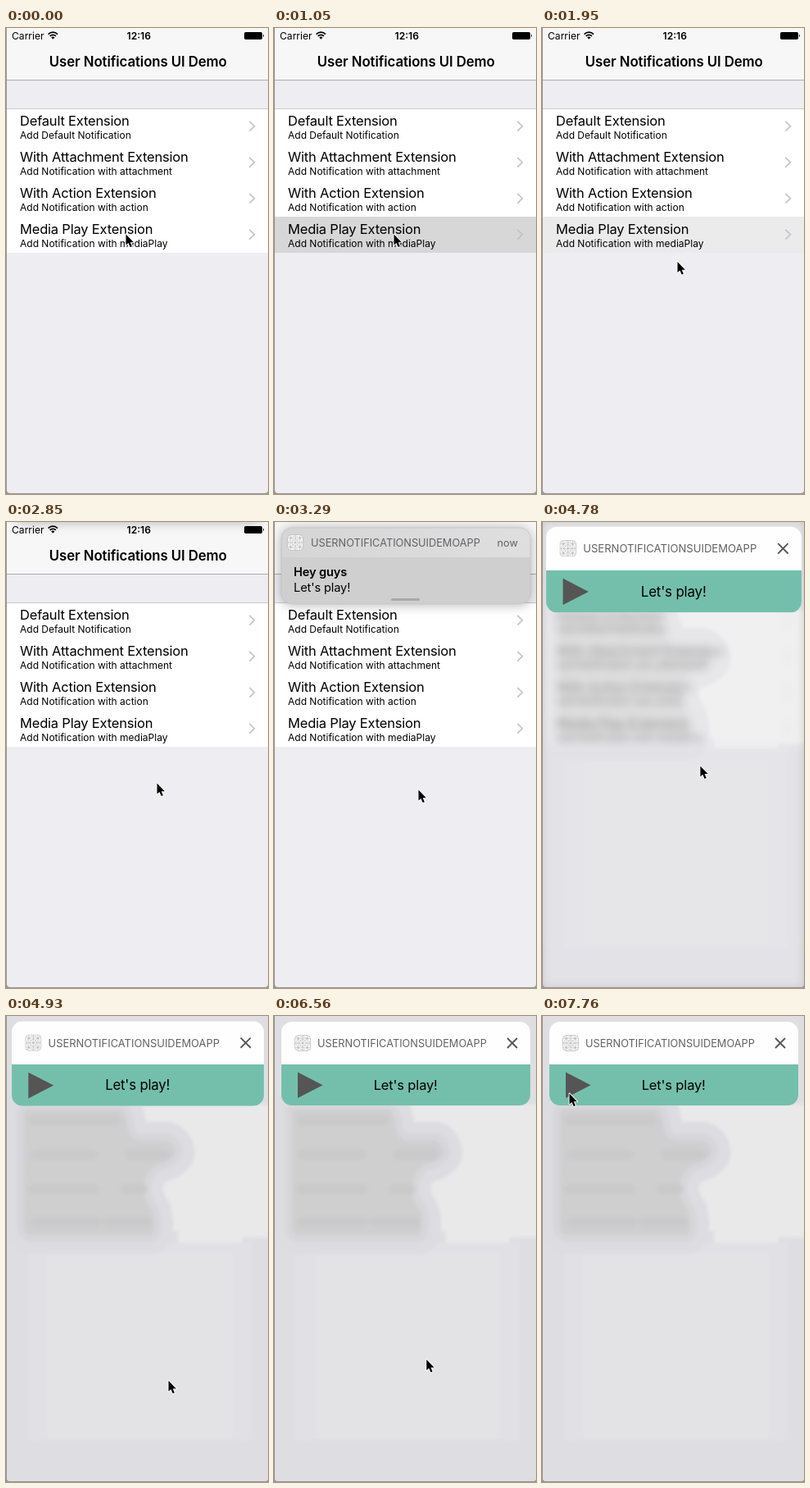
An HTML page for the animation above (8000 ms loop, 320 px wide and 568 px high).

```html
<!DOCTYPE html>
<html lang="en">
<head>
<meta charset="utf-8">
<title>Notification demo</title>
<style>
  html, body { margin: 0; width: 100%; height: 100%; overflow: hidden; background: #969698; }
  svg { display: block; }
  text { font-family: Inter, Roboto, sans-serif; fill: #000; }
  .name { font-size: 16.5px; letter-spacing: -.012em; }
  .note { font-size: 12px; }
  .title { font-size: 16.8px; font-weight: 600; letter-spacing: -.005em; text-anchor: middle; }
  .status { font-size: 12.1px; }
  .app { font-size: 12.75px; fill: #626264; }
  .msg { font-size: 14.6px; letter-spacing: -.008em; }
  .play { font-size: 16.5px; letter-spacing: -.01em; text-anchor: middle; }
  .bold { font-weight: 600; }
  .line { fill: none; }
  #banner { filter: drop-shadow(0 1px 7px rgba(0, 0, 0, .28)); }
</style>
</head>
<body>
<svg width="320" height="568" viewBox="0 0 320 568">
  <defs>
    <clipPath id="screen"><rect x="1" y="-10" width="319" height="577" rx="4"/></clipPath>
    <clipPath id="bannerShape"><rect x="9" y="7" width="304" height="93" rx="13"/></clipPath>
    <clipPath id="cardShape"><rect x="9" y="7" width="304" height="102" rx="13"/></clipPath>
    <linearGradient id="bannerHead">
      <stop offset="0" stop-color="#d5d5d6"/><stop offset="1" stop-color="#dfdfe0"/>
    </linearGradient>
    <filter id="soft" x="-20%" y="-20%" width="140%" height="140%"><feGaussianBlur stdDeviation="2"/></filter>
    <path id="blob" d="M24 114H140Q147 118 148 134Q150 150 164 152H198Q207 157 207 168Q200 178 184 181Q170 190 168 208Q168 224 178 236Q184 254 178 267H28Q20 263 22 250V126Q20 118 24 114Z"/>
    <symbol id="icon" viewBox="0 0 20 20" width="20" height="20">
      <rect x=".5" y=".5" width="19" height="19" rx="4.5" fill="#fff" stroke="#bbb" stroke-width=".8"/>
      <g fill="none" stroke="#a6a6a6" stroke-width=".5">
        <path d="M4.5 1V19M10 1V19M15.5 1V19M1 4.5H19M1 10H19M1 15.5H19M1.5 1.5L18.5 18.5M18.5 1.5L1.5 18.5"/>
        <circle cx="10" cy="10" r="8"/><circle cx="10" cy="10" r="4"/>
      </g>
    </symbol>
  </defs>

  <g clip-path="url(#screen)">
    <g id="list">
      <rect width="320" height="568" fill="#eeedf2"/>
      <rect width="320" height="63" fill="#f7f7f8"/>
      <rect y="63" width="320" height="1" fill="#acacae"/>
      <rect y="98" width="320" height="176" fill="#fff"/>
      <rect y="98" width="320" height="1" fill="#c9c8cc"/>
      <rect id="press" y="230" width="320" height="44" fill="#d7d7d7"/>
      <g id="status">
        <text class="status" x="7" y="13.5">Carrier</text>
        <text class="status bold" x="162.3" y="13.5" text-anchor="middle">12:16</text>
        <path class="line" d="M51.6 7.6A8 8 0 0 1 63 7.6M53.7 9.9A5 5 0 0 1 60.9 9.9" stroke="#000" stroke-width="1.7"/>
        <path d="M57.3 13.8L55.2 11.6A3 3 0 0 1 59.4 11.6Z"/>
        <rect x="291" y="5" width="22" height="9" rx="1.8"/>
        <path d="M314 7.8Q316 9.5 314 11.2Z"/>
      </g>
      <text class="title" x="161.3" y="47">User Notifications UI Demo</text>
      <g id="rows"></g>
    </g>

    <g id="frost">
      <rect width="320" height="568" fill="#dedee2"/>
      <g filter="url(#soft)">
        <rect x="8" width="304" height="116" fill="#dfdfe1"/>
        <path d="M166 108H330V270H288V278H210V262H192Z" fill="#e9e9ea"/>
        <rect x="26" y="276" width="274" height="241" fill="#e1e1e5"/>
        <rect x="51" y="288" width="225" height="229" fill="#e3e3e6"/>
        <rect x="-4" y="518" width="330" height="60" fill="#dddde2"/>
        <g stroke-linejoin="round">
          <use href="#blob" fill="#dcdce1" stroke="#dcdce1" stroke-width="46"/>
          <use href="#blob" fill="#d7d7da" stroke="#d7d7da" stroke-width="16"/>
          <use href="#blob" fill="#cfcfd0"/>
        </g>
        <path d="M34 127H134M36 169H106M152 169H194M34 211H108M146 211H166M36 251H110M124 251H172"
          stroke="#cacacb" stroke-width="13" stroke-linecap="round"/>
      </g>
    </g>

    <g id="banner">
      <g clip-path="url(#bannerShape)">
        <rect x="9" y="7" width="304" height="36" fill="url(#bannerHead)"/>
        <rect x="9" y="43" width="304" height="57" fill="#cfcfcf"/>
      </g>
      <rect class="line" x="9" y="7" width="304" height="93" rx="13" stroke="#bcbcbc" stroke-width=".6"/>
      <use href="#icon" x="16" y="15"/>
      <text class="app" x="45" y="30">USERNOTIFICATIONSUIDEMOAPP</text>
      <text class="app" x="272.5" y="30">now</text>
      <text class="msg bold" x="24" y="66">Hey guys</text>
      <text class="msg" x="24" y="85">Let's play!</text>
      <rect x="143" y="93" width="35" height="3" rx="1.5" fill="#a9a9a9"/>
    </g>

    <g id="card">
      <g clip-path="url(#cardShape)">
        <rect x="9" y="7" width="304" height="52" fill="#fefefe"/>
        <rect x="9" y="59" width="304" height="50" fill="#74bfab"/>
      </g>
      <use href="#icon" x="25" y="23"/>
      <text class="app" x="53" y="38">USERNOTIFICATIONSUIDEMOAPP</text>
      <path class="line" d="M285 27L297 39M297 27L285 39" stroke="#555" stroke-width="1.8"/>
      <path d="M29 68.5L59.5 84.2L29 100Z" fill="#555"/>
      <text class="play" x="160.7" y="90">Let's play!</text>
    </g>

    <path id="cursor" d="M0 0V14.2L3.2 11.3L5.6 16.9L8 15.9L5.7 10.5H10.2Z"
      stroke="#fff" stroke-width="2" stroke-linejoin="round" paint-order="stroke"/>
  </g>
</svg>

<script>
const LOOP = 8000;
const BEAT = 149; // the picture is refreshed once per beat
const el = id => document.getElementById(id);

const items = [
  ['Default Extension', 'Add Default Notification'],
  ['With Attachment Extension', 'Add Notification with attachment'],
  ['With Action Extension', 'Add Notification with action'],
  ['Media Play Extension', 'Add Notification with mediaPlay']
];
el('rows').innerHTML = items.map(([name, note], i) => `
  <g transform="translate(0 ${i * 44})">
    <text class="name" x="17" y="119">${name}</text>
    <text class="note" x="17" y="135">${note}</text>
    <path class="line chevron" d="M297.3 113.8L303.3 119.7L297.3 125.6" stroke="#c6c6cb" stroke-width="1.8"/>
  </g>`).join('');
const lastChevron = document.querySelector('#rows g:last-child .chevron');

const linear = p => p;
const easeIn = p => p ** 2.5;
const easeOut = p => 1 - (1 - p) ** 2;
const easeBoth = p => p * p * (3 - 2 * p);

// Progress from 0 to 1 between two beats.
const ramp = (beat, from, to, ease = linear) =>
  ease(Math.min(1, Math.max(0, (beat - from) / (to - from))));

const grip = { x: 186, y: 100 };
const legs = [
  { from: 12, to: 14, x: 184, y: 318, ease: linear },
  { from: 19, to: 22, x: 176, y: 326, ease: easeBoth },
  { from: 22, to: 26, ...grip, ease: easeBoth },
  { from: 28, to: 33, x: 198, y: 444, ease: easeIn },
  { from: 43, to: 49, x: 33, y: 97, ease: easeBoth },
  { from: 50, to: 52, x: 33, y: 94, ease: linear }
];

function cursorAt(beat) {
  let x = 146, y = 251;
  for (const leg of legs) {
    const p = ramp(beat, leg.from, leg.to, leg.ease);
    x += (leg.x - x) * p;
    y += (leg.y - y) * p;
  }
  return { x, y };
}

const place = (id, transform) => el(id).setAttribute('transform', transform);
const fade = (id, v) => { el(id).style.opacity = v; };

function draw(t) {
  const beat = Math.floor(t / BEAT);
  const { x, y } = cursorAt(beat);
  place('cursor', `translate(${x + .5} ${y + .5}) scale(.92)`);

  const press = beat < 7 ? 0 : 1 - ramp(beat, 12, 14);
  fade('press', press);
  lastChevron.setAttribute('stroke', press === 1 ? '#c2c2c4' : '#c6c6cb');

  // The banner slides in, then follows the dragging cursor.
  const opened = beat >= 32;
  const entry = -101 * (1 - ramp(beat, 19, 22, easeOut));
  const drag = beat > 28 ? .7 * (y - grip.y) : 0;
  place('banner', `translate(0 ${entry + drag})`);
  fade('banner', beat >= 19 && !opened ? 1 : 0);
  fade('status', 1 - ramp(beat, 19, 21));

  const frost = ramp(beat, 30, 33);
  fade('frost', frost);
  el('list').style.filter = frost ? `blur(${frost * 8}px)` : 'none';

  const scale = 1 + .013 * .5 ** (beat - 33);
  fade('card', opened ? 1 : 0);
  place('card', `translate(161 58) scale(${opened ? scale : 1}) translate(-161 -58)`);
}

const start = performance.now();
function tick() {
  draw((performance.now() - start) % LOOP);
  requestAnimationFrame(tick);
}
draw(0);
requestAnimationFrame(tick);
</script>
</body>
</html>
```
